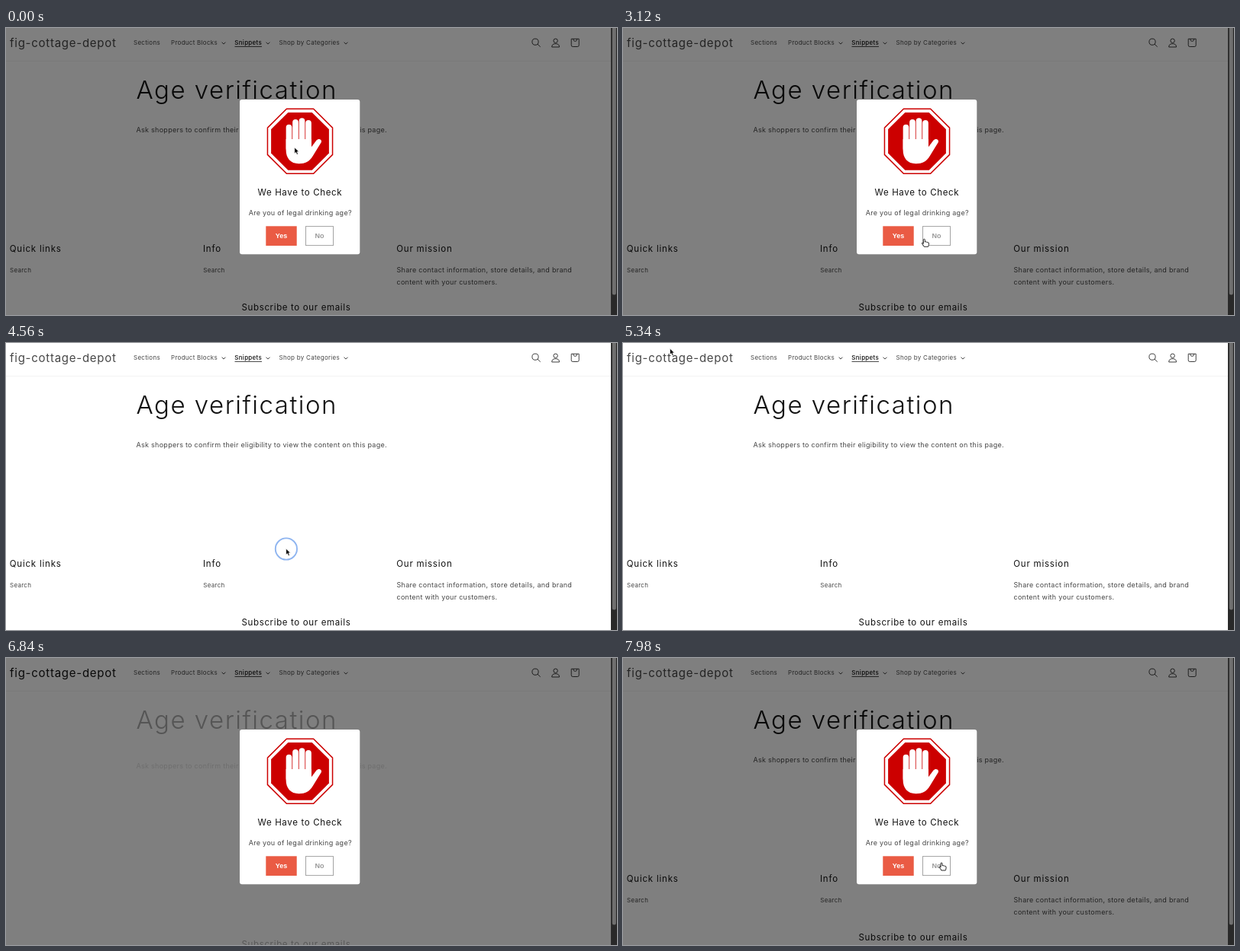
An HTML page that plays this animation: 800 by 377 pixels, repeating every 8 s.

```html
<!DOCTYPE html>
<html lang="en">
<head>
<meta charset="utf-8">
<title>Age verification</title>
<style>
  html, body { margin: 0; width: 100%; height: 100%; overflow: hidden; background: #fff; }
  svg { display: block; width: 100%; height: 100%; }
  text { font-family: Inter, sans-serif; font-optical-sizing: none; white-space: pre; }
  .head { fill: #121212; font-size: 11.5px; letter-spacing: .78px; }
  .tight { letter-spacing: .65px; }
  .title { fill: #121212; font-size: 33px; font-weight: 300; letter-spacing: 1.5px; }
  .logo { font-size: 15px; letter-spacing: .74px; }
  .body { fill: #474747; font-size: 9px; letter-spacing: .28px; }
  .small { fill: #474747; font-size: 8px; letter-spacing: .28px; }
  .active { fill: #121212; font-weight: 500; }
  .btn { font: bold 9px "Liberation Sans", Arial, sans-serif; text-anchor: middle; }
  .line { fill: none; stroke: #2a2a2a; stroke-width: .9; }
</style>
</head>
<body>
<svg viewBox="0 0 800 377" preserveAspectRatio="none">
  <defs><path id="caret" class="line" d="M-2.4-1.2L0 1.2 2.4-1.2"/></defs>
  <rect width="800" height="377" fill="#fff"/>

  <g id="header">
    <path d="M0 43.5H792" stroke="#f3f3f3"/>
    <text id="logo" class="logo" x="5" y="24.7">fig-cottage-depot</text>
    <text class="small" x="167" y="22.4">Sections</text>
    <text class="small" x="216" y="22.4">Product Blocks</text>
    <text class="small active" x="299.3" y="22.4">Snippets</text>
    <text class="small" x="357.5" y="22.4">Shop by Categories</text>
    <path d="M299.5 24.4H335" stroke="#121212" stroke-width=".8"/>
    <use href="#caret" x="285" y="19.9"/>
    <use href="#caret" x="343" y="19.9"/>
    <use href="#caret" x="445" y="19.9"/>
    <g class="line">
      <circle cx="693" cy="18.2" r="4.1"/>
      <path d="M696 21.2L699.7 24.8"/>
      <circle cx="719.6" cy="16.8" r="2.7"/>
      <path d="M714.7 25c0-3.3 2-4.3 4.9-4.3s4.9 1 4.9 4.3z"/>
      <path d="M740.2 14.3h10v8.2a2 2 0 0 1-2 2h-6a2 2 0 0 1-2-2z"/>
      <path d="M742.8 14.3v.7a2.4 2.4 0 0 0 4.8 0v-.7"/>
    </g>
  </g>

  <text id="title" class="title" x="170.5" y="93.2">Age verification</text>
  <text id="intro" class="body" x="170.5" y="136.9">Ask shoppers to confirm their eligibility to view the content on this page.</text>

  <g id="columns">
    <text class="head" x="4.8" y="294.4">Quick links</text>
    <text class="small" x="5" y="320.8">Search</text>
    <text class="head" x="258" y="294.4">Info</text>
    <text class="small" x="258.3" y="320.8">Search</text>
    <text class="head" x="511.3" y="294.4">Our mission</text>
    <text class="body" x="511.5" y="320.8">Share contact information, store details, and brand</text>
    <text class="body" x="511.5" y="337.3">content with your customers.</text>
  </g>
  <text id="subscribe" class="head tight" x="308.5" y="371.2">Subscribe to our emails</text>

  <g id="modal">
    <rect width="792" height="377" opacity=".5"/>
    <rect x="306" y="94" width="157.3" height="203.3" rx="3" fill="#fff"/>
    <g id="sign"></g>
    <path fill="#fff" d="M366.6 146H399.8V156.5L406.5 147.5C409 144.3 414.3 146.3 412.7 150.3L401.5 168.5C397 175.6 392 178.2 383.5 178.2C372.5 178.2 366.6 171 366.6 160Z"/>
    <text class="head tight" x="329.5" y="219.9">We Have to Check</text>
    <text class="body" x="317.7" y="246">Are you of legal drinking age?</text>
    <rect x="340.3" y="260.3" width="40.4" height="25.7" fill="#ea5b44"/>
    <text class="btn" x="360.5" y="276.2" fill="#fff">Yes</text>
    <rect x="392.5" y="260.6" width="36" height="25" fill="#fff" stroke="#a3a3a3"/>
    <text class="btn" x="410.4" y="276.2" fill="#999">No</text>
    <g id="wiped">
      <rect x="352" y="255" width="29.5" height="32" fill="#fff"/>
      <path d="M352 285.8H381" stroke="#d9d9d9" stroke-width=".8"/>
    </g>
  </g>

  <rect x="792" width="8" height="377" fill="#292929"/>
  <rect x="793.8" y="-6" width="5" height="356.5" rx="2.5" fill="#707070"/>

  <circle id="ring" cx="366.9" cy="270.5" fill="none" stroke="#8fb5f0" stroke-width="1.9"/>
  <g id="cursor" stroke-linejoin="round">
    <path id="arrow" d="M0 0V7.8L1.8 6.2 3.1 9.2 4.6 8.5 3.3 5.6H5.7Z" stroke="#fff" stroke-width=".6"/>
    <path id="hand" fill="#fff" stroke="#111" stroke-width=".9"
      d="M-1 6V1a1 1 0 0 1 2 0V3.8Q2.2 3 2.8 4 4 3.4 4.5 4.5 6 4.2 6 5.2V7Q6 8.4 5.2 10H-.2Q-.8 8.4-3.2 5.5-3.2 4.2-1 6Z"/>
  </g>
</svg>
<script>
const LOOP = 8000, STEP = 60;
const CLICK = 4380, DISMISS = 4560, RELOAD = 6840;
const $ = id => document.getElementById(id);
const lerp = (a, b, u) => a + (b - a) * u;
const clamp = u => Math.max(0, Math.min(1, u));
const progress = (t, from, to) => clamp((t - from) / (to - from));
const easeInOut = u => (1 - Math.cos(Math.PI * u)) / 2;
const easeOut = u => 1 - (1 - u) ** 3;
const show = (id, on) => $(id).setAttribute('display', on ? 'inline' : 'none');

function octagon(r, fill) {
  const d = Array.from({ length: 8 }, (_, i) => {
    const a = (i + .5) * Math.PI / 4, R = r / Math.cos(Math.PI / 8);
    return `${385 + R * Math.cos(a)} ${148.8 + R * Math.sin(a)}`;
  });
  return `<path d="M${d.join('L')}Z" fill="${fill}"/>`;
}

function finger(i) {
  const top = 122 + 2.4 * (i - 1.9) ** 2;
  return `<path d="M${370.5 + 8.5 * i} ${top}V158" stroke="#fff" stroke-width="7.7" stroke-linecap="round"/>`;
}

$('sign').innerHTML = octagon(43.3, '#c00') + octagon(41.8, '#fff') + octagon(37.9, '#c00')
  + [0, 1, 2, 3].map(finger).join('');

// Pointer moves: each eases from the previous stop
const moves = [
  { from: 0, to: 300, x: 386, y: 112 },
  { from: 959, to: 960, x: 354.5, y: 265 },
  { from: 1380, to: 1620, x: 447, y: 107 },
  { from: 1620, to: 1860, x: 389.5, y: 278 },
  { from: 1860, to: 2100, x: 354, y: 172 },
  { from: 2520, to: 2880, x: 409, y: 281 },
  { from: 2880, to: 3480, x: 366.7, y: 270.2 },
  { from: 4920, to: 5100, x: 455, y: 190 },
  { from: 5100, to: 5400, x: 20, y: -12 },
  { from: 7200, to: 7620, x: 369, y: 250 },
  { from: 7620, to: 7980, x: 417, y: 269 }
];

function pointerAt(t) {
  let x = 377.8, y = 157;
  for (const m of moves) {
    const u = easeInOut(progress(t, m.from, m.to));
    x = lerp(x, m.x, u);
    y = lerp(y, m.y, u);
  }
  return [x, y];
}

function overButton(x, y) {
  return y >= 260 && y <= 286 && (x >= 340 && x <= 381 || x >= 392 && x <= 429);
}

// Slide-in after the reload
function reveal(id, t, alpha, rise, delay = 0) {
  const start = RELOAD + delay;
  const e = t < RELOAD ? 1 : easeOut(progress(t, start, start + 500));
  $(id).setAttribute('opacity', lerp(alpha, 1, e));
  $(id).setAttribute('transform', `translate(0 ${lerp(rise, 0, e)})`);
}

function draw(time) {
  const t = Math.floor(time / STEP) * STEP;

  show('modal', t < DISMISS || t >= RELOAD);
  show('wiped', t >= DISMISS - STEP && t < DISMISS);
  $('logo').setAttribute('fill', t >= RELOAD && t < RELOAD + 240 ? '#121212' : '#474747');

  reveal('title', t, .35, 0);
  reveal('intro', t, .18, 8.5);
  reveal('subscribe', t, .33, 8.5);
  reveal('columns', t, 0, 11, STEP);

  show('ring', t >= CLICK && t < CLICK + 360);
  $('ring').setAttribute('r', lerp(8.5, 14.2, easeOut(progress(t, CLICK, CLICK + 240))));
  $('ring').setAttribute('opacity', 1 - progress(t, CLICK + 180, CLICK + 360));

  const [x, y] = pointerAt(t);
  const onButton = overButton(x, y) && (t < CLICK || t >= RELOAD);
  $('cursor').setAttribute('transform', `translate(${x} ${y})`);
  show('arrow', !onButton);
  show('hand', onButton);
}

const start = performance.now();
function tick() {
  draw((performance.now() - start) % LOOP);
  requestAnimationFrame(tick);
}
tick();
</script>
</body>
</html>
```
